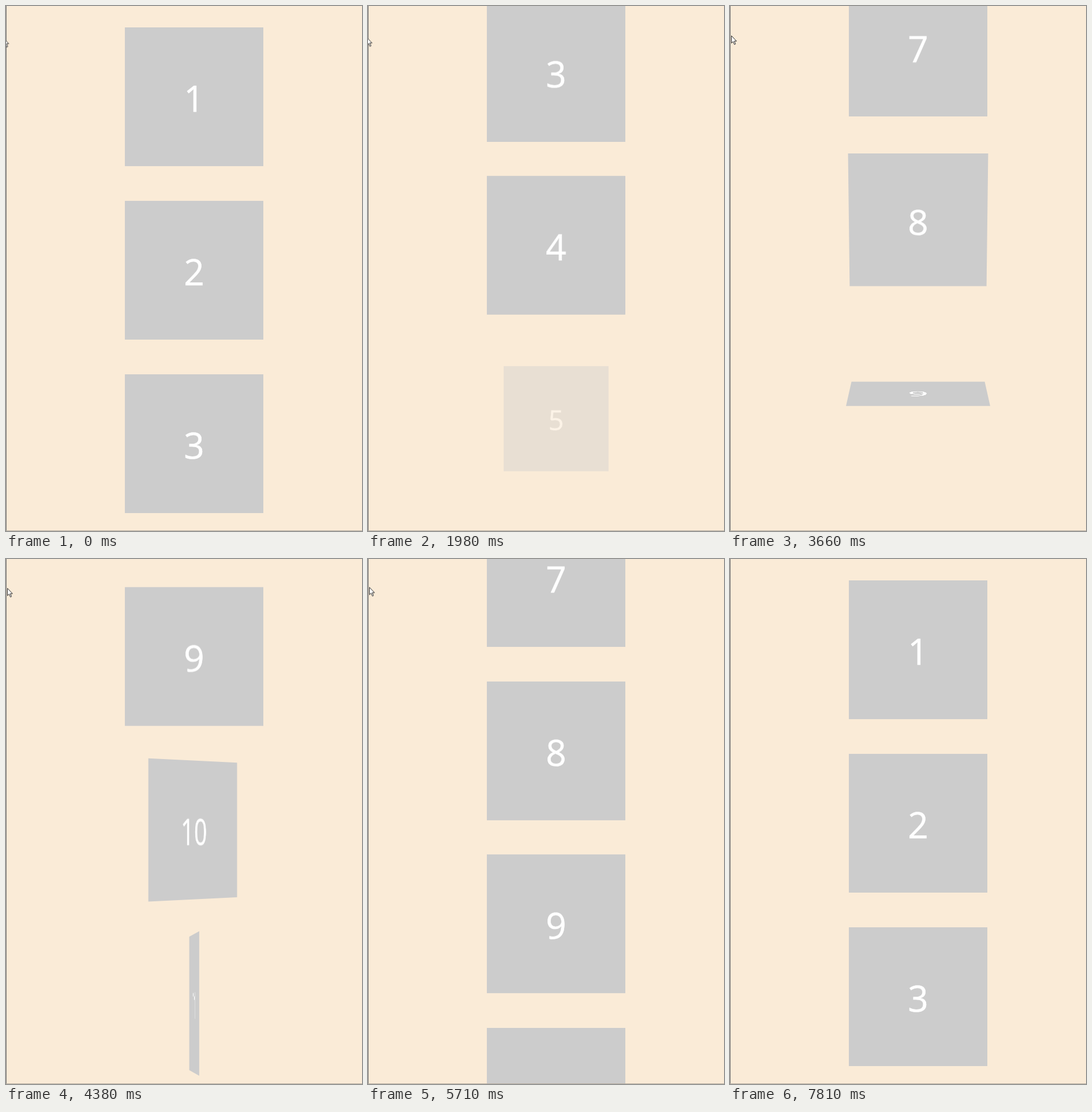
These frames come from a looping animation (617 by 908 pixels, 7950 ms). An HTML page:

```html
<!DOCTYPE html>
<html lang="en">
<head>
<meta charset="utf-8">
<title>Reveal on scroll</title>
<style>
  html, body { margin: 0; width: 100%; height: 100%; overflow: hidden; background: #faebd7; }
  #stage { position: relative; width: 617px; height: 908px; overflow: hidden; }
  #page { position: absolute; inset: 0; }
  .box {
    position: absolute; left: 206.2px; width: 239.8px; height: 239.8px;
    background: #ccc; color: #fff; text-align: center;
    font: 62px/244px "Open Sans", "Noto Sans", sans-serif;
    -webkit-text-stroke: .6px #fff;
    backface-visibility: hidden; will-change: transform;
  }
  .edge { position: absolute; left: 0; bottom: 0; }
  #left { width: 1px; height: 100%; background: #777; }
  #bottom { width: 100%; height: 1px; background: #b5aca0; }
  #cursor { position: absolute; left: 0; top: 0; overflow: visible; }
</style>
</head>
<body>
<div id="stage">
  <div id="page"></div>
  <div id="left" class="edge"></div>
  <div id="bottom" class="edge"></div>
  <svg id="cursor" width="10" height="17">
    <path d="M.5 .5V13.2L3.4 10.5 5.6 15.6 7.6 14.7 5.4 9.8H9.3Z" fill="#fff" stroke="#222"/>
  </svg>
</div>
<script>
const LOOP = 7950, BOXES = 11, TOP = 37, PITCH = 299.8, REVEAL = 600;
const WHEEL = 119.9;               // scroll distance of one wheel click
const TICK = 137.8, PHASE = 54.6;  // the picture refreshes once per tick

// Wheel flicks: [start, end, clicks from the top]
const flicks = [
  [430, 880, 2], [1040, 1178, 3], [1520, 2000, 6], [2230, 2640, 9],
  [3080, 3729, 16], [4080, 4387, 20.24], [5050, 7126, 0]
];

const flip = (axis, angle) => `perspective(3000px) rotate${axis}(${angle}deg)`;

// Box number: [start, hidden transform, shown transform, hidden opacity]
const reveals = {
  4: [965, "translateX(120px)", "none", 0],
  5: [1700, "scale(.6)", "none", 0],
  6: [2318, "scale(1.2)", "none", 0],
  7: [2522, "translateY(100%)", "none", 1],
  8: [3321, flip("X", -100), flip("X", 0), 1],
  9: [3543, flip("X", 100), flip("X", 0), 1],
  10: [4151, flip("Y", 100), flip("Y", 0), 1],
  11: [4250, flip("Y", -100), flip("Y", 0), 1]
};

// The pointer drifts at the left edge, leaves, then crosses the lower right corner.
const pointerPath = [
  [0, -4.5, 55.5], [1157, -4, 55.5], [3637, 2, 51], [5704, 2, 48.5], [7100, 2, 48.5],
  [7100, -50, 0], [7350, -50, 0],
  [7350, 588, 860], [7640, 605, 892],
  [7640, -50, 0], [LOOP, -50, 0]
];

const page = document.getElementById("page");
const animations = [];

function addAnimation(element, frames, options) {
  const animation = element.animate(frames, { fill: "both", ...options });
  animation.pause();
  animations.push(animation);
}

function moveAlong(element, points, easing) {
  const frames = points.map(([time, x, y]) =>
    ({ offset: time / LOOP, transform: `translate(${x}px, ${y}px)`, easing }));
  addAnimation(element, frames, { duration: LOOP });
}

for (let n = 1; n <= BOXES; n++) {
  const box = document.createElement("div");
  box.className = "box";
  box.textContent = n;
  box.style.top = TOP + (n - 1) * PITCH + "px";
  page.append(box);
  if (!reveals[n]) continue;
  const [delay, hidden, shown, opacity] = reveals[n];
  addAnimation(box, [{ transform: hidden, opacity }, { transform: shown, opacity: 1 }],
    { delay, duration: REVEAL, easing: "ease" });
}

let clicks = 0;
const scrollPath = [[0, 0, 0]];
for (const [start, end, target] of flicks) {
  scrollPath.push([start, 0, -clicks * WHEEL], [end, 0, -target * WHEEL]);
  clicks = target;
}
scrollPath.push([LOOP, 0, 0]);

moveAlong(page, scrollPath, "ease-in-out");
moveAlong(document.getElementById("cursor"), pointerPath, "linear");

const start = performance.now();

function draw() {
  const time = (performance.now() - start) % LOOP;
  const held = Math.max(0, Math.floor((time - PHASE) / TICK) * TICK + PHASE);
  for (const animation of animations) animation.currentTime = held;
  requestAnimationFrame(draw);
}
draw();
</script>
</body>
</html>
```
